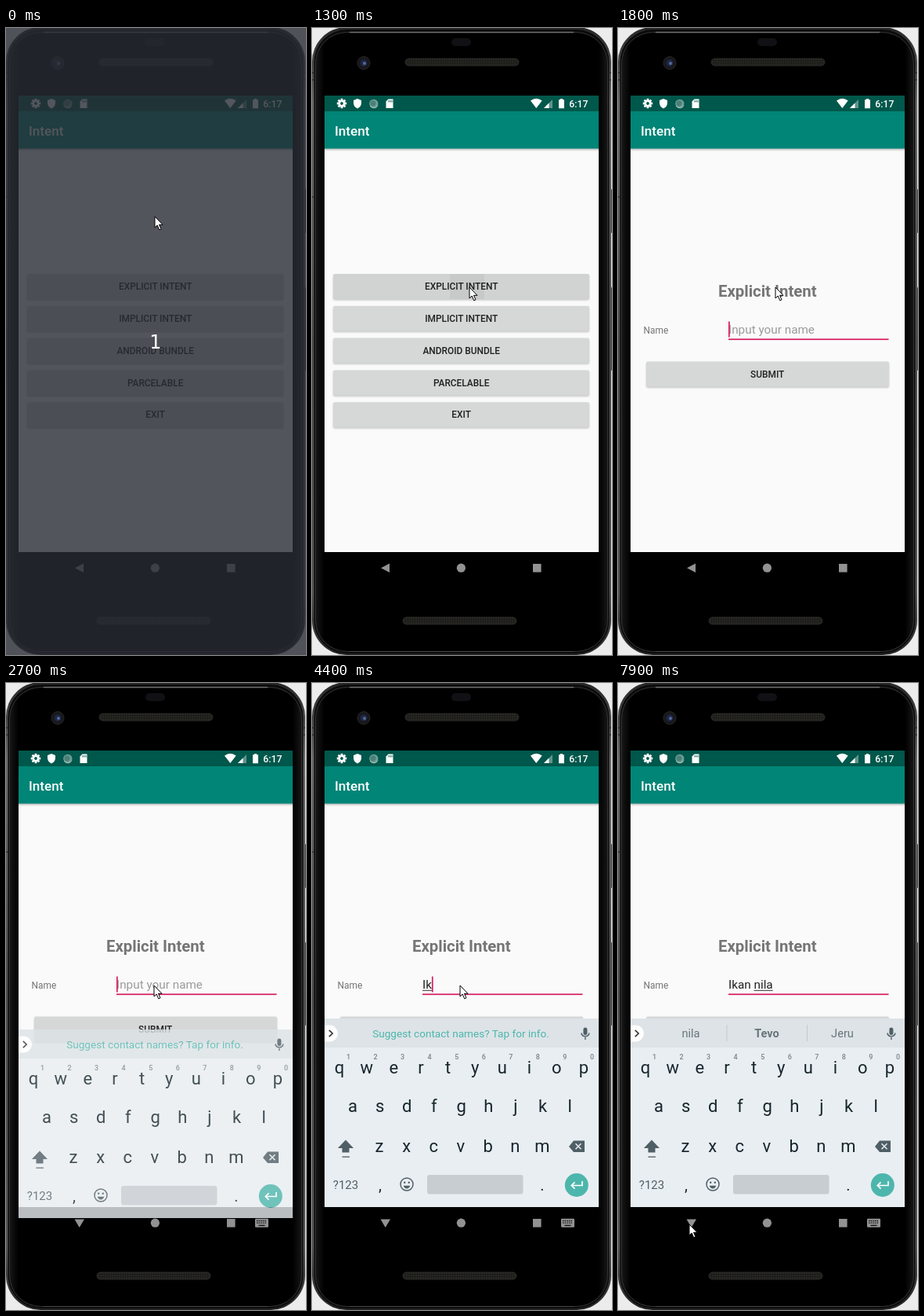
Animation of 383x798 px, one loop 8000 ms. Source, as an HTML page:

```html
<!DOCTYPE html>
<html lang="en">
<head>
<meta charset="utf-8">
<title>Intent demo</title>
<style>
  html, body { margin: 0; width: 100%; height: 100%; overflow: hidden; background: #ececec; }
  svg { display: block; width: 383px; height: 798px; font-family: Roboto, sans-serif; }
  .mid { text-anchor: middle; }
  .medium { font-weight: 500; }
  .key { font-size: 22px; fill: #16262c; }
  .small { font-size: 9px; fill: #77858b; font-weight: 500; }
  .tip { font-size: 14.6px; fill: #68757b; }
</style>
</head>
<body>
<svg id="stage" viewBox="0 0 383 798" xmlns="http://www.w3.org/2000/svg"></svg>
<script>
const LOOP = 8000, STEP = 100;
const stage = document.getElementById('stage');

const rect = (x, y, w, h, fill, extra = '') =>
  `<rect x="${x}" y="${y}" width="${w}" height="${h}" fill="${fill}" ${extra}/>`;
const path = (d, fill, extra = '') => `<path d="${d}" fill="${fill}" ${extra}/>`;
const line = (d, color, width, extra = '') =>
  path(d, 'none', `stroke="${color}" stroke-width="${width}" ${extra}`);
const circle = (x, y, r, fill, extra = '') =>
  `<circle cx="${x}" cy="${y}" r="${r}" fill="${fill}" ${extra}/>`;
const text = (x, y, size, fill, str, extra = '') =>
  `<text x="${x}" y="${y}" font-size="${size}" fill="${fill}" ${extra}>${str}</text>`;
const button = (x, y, w, label) =>
  rect(x, y + 1.5, w, 32, '#000', 'rx="2" opacity=".2" filter="url(#soft)"') +
  rect(x, y, w, 32, '#d6d7d7', 'rx="2"') +
  text(190.7, y + 20.2, 11.9, '#202020', label, 'class="mid medium"');

const page = content =>
  rect(16, 86, 350, 581, '#fafafa') +
  rect(16, 153, 350, 4, 'url(#drop)') +
  rect(16, 86, 350, 20, '#00574b') +
  rect(16, 106, 350, 47.5, '#008577') +
  text(29, 136.6, 17.1, '#fff', 'Intent', 'class="medium"') + content;

const defs = `<defs>
  <filter id="soft"><feGaussianBlur stdDeviation=".8"/></filter>
  <linearGradient id="drop" x2="0" y2="1">
    <stop stop-color="#000" stop-opacity=".28"/><stop offset="1" stop-color="#000" stop-opacity="0"/>
  </linearGradient>
  <linearGradient id="rim" x2="0" y2="1">
    <stop stop-color="#262626"/><stop offset=".12" stop-color="#6a6a6a"/>
    <stop offset=".5" stop-color="#4c4c4c"/><stop offset=".9" stop-color="#555"/>
    <stop offset="1" stop-color="#222"/>
  </linearGradient>
  <linearGradient id="glass">
    <stop stop-color="#171717"/><stop offset=".03" stop-color="#000"/>
    <stop offset=".97" stop-color="#000"/><stop offset="1" stop-color="#171717"/>
  </linearGradient>
  <pattern id="mesh" width="3" height="3" patternUnits="userSpaceOnUse">
    <rect width="3" height="3" fill="#1b1b19"/><circle cx="1" cy="1" r=".8" fill="#393832"/>
  </pattern>
  <clipPath id="screen"><rect x="16" y="86" width="350" height="621"/></clipPath>
  <clipPath id="firstButton"><rect x="27" y="313" width="327" height="32" rx="2"/></clipPath>
</defs>`;

const speaker = (x, y) => rect(x, y, 145, 9, 'url(#mesh)', 'rx="4.5" stroke="#2c2c2a"');

const phone =
  rect(0, 0, 383, 798, '#ececec') +
  rect(380, 205, 3, 56, '#555', 'rx="1"') + rect(380, 330, 3, 106, '#555', 'rx="1"') +
  rect(0, -1, 382, 799, 'url(#rim)', 'rx="44"') +
  rect(2.5, 2, 377, 794, '#0b0b0b', 'rx="42"') +
  rect(4.5, 5.5, 373, 788, 'url(#glass)', 'rx="40" stroke="#353535"') +
  line('M48 5.5H334', '#707070', 1.4) + line('M48 793.5H334', '#484848', 1) +
  line('M0 57H4M0 66H4M378 57H382M378 66H382M0 215H4', '#1a1a1a', 1) +
  speaker(119, 39) + speaker(116, 750) +
  rect(178, 13, 25, 10, '#111115', 'rx="5"') +
  circle(66, 44.5, 8, '#17171a', 'stroke="#29292c"') +
  circle(66, 44.5, 4.5, '#1d2743') + circle(67, 45, 2, '#53699b');

const teeth = Array.from({ length: 8 }, (_, i) =>
  rect(36.6, 89.8, 2.8, 4, '#fff', `transform="rotate(${i * 45} 38 96)"`)).join('');
const status =
  teeth + circle(38, 96, 3.2, 'none', 'stroke="#fff" stroke-width="2.6"') +
  path('M58 90L63 92V96Q62.5 100.5 58 102.5Q53.5 100.5 53 96V92Z', '#fff') +
  circle(78.8, 96.3, 5.6, '#6f9f98') + circle(78, 95.8, 3.6, '#4b8078') +
  line('M74 99A5.6 5.6 0 0 0 84 98.5', '#a8c7c2', 1) +
  path('M97.5 90.5H103.5V102H94.5V93.5Z', '#fff') +
  line('M98 92V94.5M100 92V94.5M102 92V94.5', '#00574b', .9) +
  path('M279 92.5Q286.3 87 293.7 92.5L286.3 102Z', '#fff') +
  path('M307 91V102H296Z', '#5f938c') + path('M302.5 95.5V102H296Z', '#fff') +
  path('M317 90H320V91.3H322V102.2H315V91.3H317Z', '#fff') +
  text(328.3, 100.8, 12.2, '#fff', '6:17', 'class="medium"');

const home = page(
  ['EXPLICIT INTENT', 'IMPLICIT INTENT', 'ANDROID BUNDLE', 'PARCELABLE', 'EXIT']
    .map((label, i) => button(27, 313 + i * 40.8, 327, label)).join('') +
  `<g clip-path="url(#firstButton)" id="ripple">${rect(27, 313, 327, 32, '#000', 'opacity=".025"')}
   <rect id="wave" y="313" height="32" fill="#000" opacity=".045"/></g>`);

const form = page(
  text(190.8, 342, 20.4, '#757575', 'Explicit Intent', 'class="mid" font-weight="700"') +
  text(32.5, 389, 11.9, '#757575', 'Name') +
  text(141, 389.3, 15.3, '#9b9b9b', 'Input your name', 'id="hint"') +
  '<text y="389.3" font-size="15.3" fill="#212121"><tspan id="done" x="141" xml:space="preserve"></tspan></text>' +
  '<text id="word" y="389.3" font-size="15.3" fill="#212121"></text>' +
  '<rect id="underline" y="390.8" height="1" fill="#333"/>' +
  rect(141, 395.4, 204.5, 1.7, '#d81b60') +
  '<rect id="caret" y="373.5" width="1.7" height="20" fill="#d81b60"/>' +
  button(36, 424.5, 310, 'SUBMIT'));

const keyRow = (letters, x, y) => [...letters].map((c, i) =>
  text(x + i * 34.65, y, 22, '#16262c', c, 'class="key mid"')).join('');
const ICON = '#4f5f66';
const keyboard =
  rect(16, 427, 350, 240, '#e9eef2') + rect(16, 427, 350, 37, '#dde3e7') +
  path('M16 435.5H22.5A10.5 10.5 0 0 1 22.5 456.5H16Z', '#fff') +
  line('M21.8 441.8L26.2 446L21.8 450.2', '#333', 1.6) +
  text(190, 451, 13.6, '#4db6ac', 'Suggest contact names? Tap for info.', 'id="notice" class="mid"') +
  `<g id="tips">${line('M139 435V456M241.5 435V456', '#c3cbd0', 1)}
    ${[93, 190, 286.5].map((x, i) =>
      `<text class="tip mid" x="${x}" y="451" font-weight="${i === 1 ? 700 : 400}"></text>`).join('')}</g>` +
  rect(346.4, 438.5, 5, 9.5, ICON, 'rx="2.5"') +
  line('M343.8 445.5A5.2 5.2 0 0 0 354 445.5M348.9 451V454', ICON, 1.4) +
  keyRow('qwertyuiop', 35, 496.7) + keyRow('asdfghjkl', 52, 546.2) + keyRow('zxcvbnm', 86, 596.8) +
  [...'1234567890'].map((c, i) => text(46.5 + i * 34.55, 479, 9, '#77858b', c, 'class="small mid"')).join('') +
  path('M43 581.5L53 592H47.5V597.5H38.5V592H33Z', ICON) + rect(38.5, 602.5, 9.5, 1.3, ICON) +
  path('M328 590L334 582.5H348V597H334Z', ICON) +
  line('M336.5 586.3L343.5 593.3M343.5 586.3L336.5 593.3', '#e9eef2', 1.5) +
  text(43, 644, 15, ICON, '?123', 'class="mid"') +
  text(87, 646, 20, '#16262c', ',', 'class="mid"') + text(294, 646, 20, '#16262c', '.', 'class="mid"') +
  circle(121, 638, 8, 'none', `stroke="${ICON}" stroke-width="1.5"`) +
  circle(118.2, 635.8, 1.2, ICON) + circle(123.8, 635.8, 1.2, ICON) +
  path('M116.6 639.8H125.4Q124 643.4 121 643.4T116.6 639.8Z', ICON) +
  rect(147, 626, 122.5, 24.5, '#c8cdd1', 'rx="3"') +
  circle(337.8, 639, 15, '#4db6ac') +
  line('M345 634V639.5H331.5M335.5 635.3L331.3 639.5L335.5 643.7', '#fff', 1.7);

const NAV = '#929292';
const nav =
  path('M99 681.5V693L88 687.2Z', NAV, 'id="back"') +
  path('M87.5 682.5H100L93.7 693Z', NAV, 'id="hide"') +
  circle(190.4, 687.2, 5.6, NAV) + rect(282, 682, 10.6, 10.6, NAV) +
  `<g id="switcher">${rect(318, 681.8, 17, 11, NAV, 'rx="1.3"')}
   ${line('M320 684.5H333M320 687.2H333', '#111', 1.3, 'stroke-dasharray="1.5 1.1"')}
   ${line('M322.5 690.4H330.5', '#111', 1.3)}</g>`;

stage.innerHTML = defs + phone +
  `<g clip-path="url(#screen)"><g id="home">${home}</g><g id="form">${form}</g>
   <g id="keyboard">${keyboard}</g></g>${status}${nav}
   <g id="countdown">${rect(0, 0, 383, 798, '#282c34', 'opacity=".8"')}
   ${text(191, 408, 24, '#fff', '1', 'class="mid" style="font-family:\'DejaVu Sans\',sans-serif"')}</g>
   ${path('M0 0V14L3.2 11L5.7 16.8L8 15.8L5.5 10.3H10Z', '#fff', 'id="pointer" stroke="#000" stroke-width="1"')}`;

const el = Object.fromEntries([...stage.querySelectorAll('[id]')].map(n => [n.id, n]));
const tips = el.tips.querySelectorAll('text');
const show = (node, on) => node.setAttribute('display', on ? 'inline' : 'none');
const move = (node, x, y) => node.setAttribute('transform', `translate(${x} ${y})`);

// Points are [time, ...values]; values are interpolated linearly.
function track(points, t) {
  const next = points.findIndex(p => p[0] > t);
  if (next === 0) return points[0].slice(1);
  if (next < 0) return points[points.length - 1].slice(1);
  const a = points[next - 1], b = points[next], k = (t - a[0]) / (b[0] - a[0]);
  return a.slice(1).map((v, i) => v + (b[i + 1] - v) * k);
}
const latest = (list, t) => list.filter(p => p[0] <= t).pop();

const POINTER = [[200, 190, 240], [300, 192, 250], [400, 197, 273], [600, 200, 310], [800, 201, 330],
  [1800, 201, 330], [1900, 200, 338], [2100, 191, 369], [2200, 189, 379], [2400, 189, 385],
  [7100, 189, 385], [7200, 186, 400], [7300, 168, 470], [7400, 130, 590], [7500, 88, 695],
  [7600, 75, 721], [7700, 80, 711], [7800, 88, 696], [7900, 91, 689]];
const ENTER = [[1400, 46, 0], [1500, 40, .28], [1600, 12, 1], [1700, 3, 1], [1800, 0, 1]];
const RISE = [[2700, 14, .8], [2800, 14, .8], [2900, 4, 1], [3000, 0, 1]];
const CARET = [[0, 1], [2200, 0], [2700, 1], [3400, 0], [3600, 1], [4100, 0], [4200, 1],
  [6800, 0], [7300, 1], [7800, 0]];
// [time, committed text, word being composed, suggestions]
const TYPING = [[0, '', ''], [4200, '', 'I'], [4400, '', 'Ik'],
  [4800, '', 'Ikan', 'Ikan', 'Iman', 'Island'], [5000, 'Ikan ', '', 'is', 'and', 'from'],
  [5500, 'Ikan ', 'n', 'n', 'no', 'not'], [6000, 'Ikan ', 'ni', 'ni', 'no', 'night'],
  [6300, 'Ikan ', 'nila', 'nila', 'Tevo', 'Jeru']];

function typeText(t) {
  const [, done, word, ...words] = latest(TYPING, t);
  const space = done ? 3.8 : 0;
  el.done.textContent = done.trim();
  const start = 141 + (done ? el.done.getComputedTextLength() + space : 0);
  el.word.textContent = word;
  el.word.setAttribute('x', start);
  const width = word ? el.word.getComputedTextLength() : 0;
  el.underline.setAttribute('x', start);
  el.underline.setAttribute('width', width);
  el.caret.setAttribute('x', start + width);
  show(el.hint, !done && !word);
  show(el.notice, !words.length);
  show(el.tips, words.length);
  tips.forEach((tip, i) => tip.textContent = words[i] || '');
}

function draw(t) {
  show(el.countdown, t < 200);
  move(el.pointer, ...track(POINTER, t));

  show(el.ripple, t >= 1300);
  const [half] = track([[1300, 22], [1500, 62], [1700, 164]], t);
  el.wave.setAttribute('x', 198 - half);
  el.wave.setAttribute('width', half * 2);

  const [drop, alpha] = track(ENTER, t);
  show(el.form, t >= 1400);
  move(el.form, 0, drop);
  el.form.setAttribute('opacity', alpha);

  const typing = t >= 2700;
  const [offset, opacity] = track(RISE, t);
  show(el.keyboard, typing);
  move(el.keyboard, 0, offset);
  el.keyboard.setAttribute('opacity', opacity);
  show(el.back, !typing);
  show(el.hide, typing);
  show(el.switcher, typing);

  typeText(t);
  show(el.caret, latest(CARET, t)[1]);
}

const begin = performance.now();
function tick() {
  const t = (performance.now() - begin) % LOOP;
  draw(Math.floor(t / STEP) * STEP);
  requestAnimationFrame(tick);
}
tick();
</script>
</body>
</html>
```
